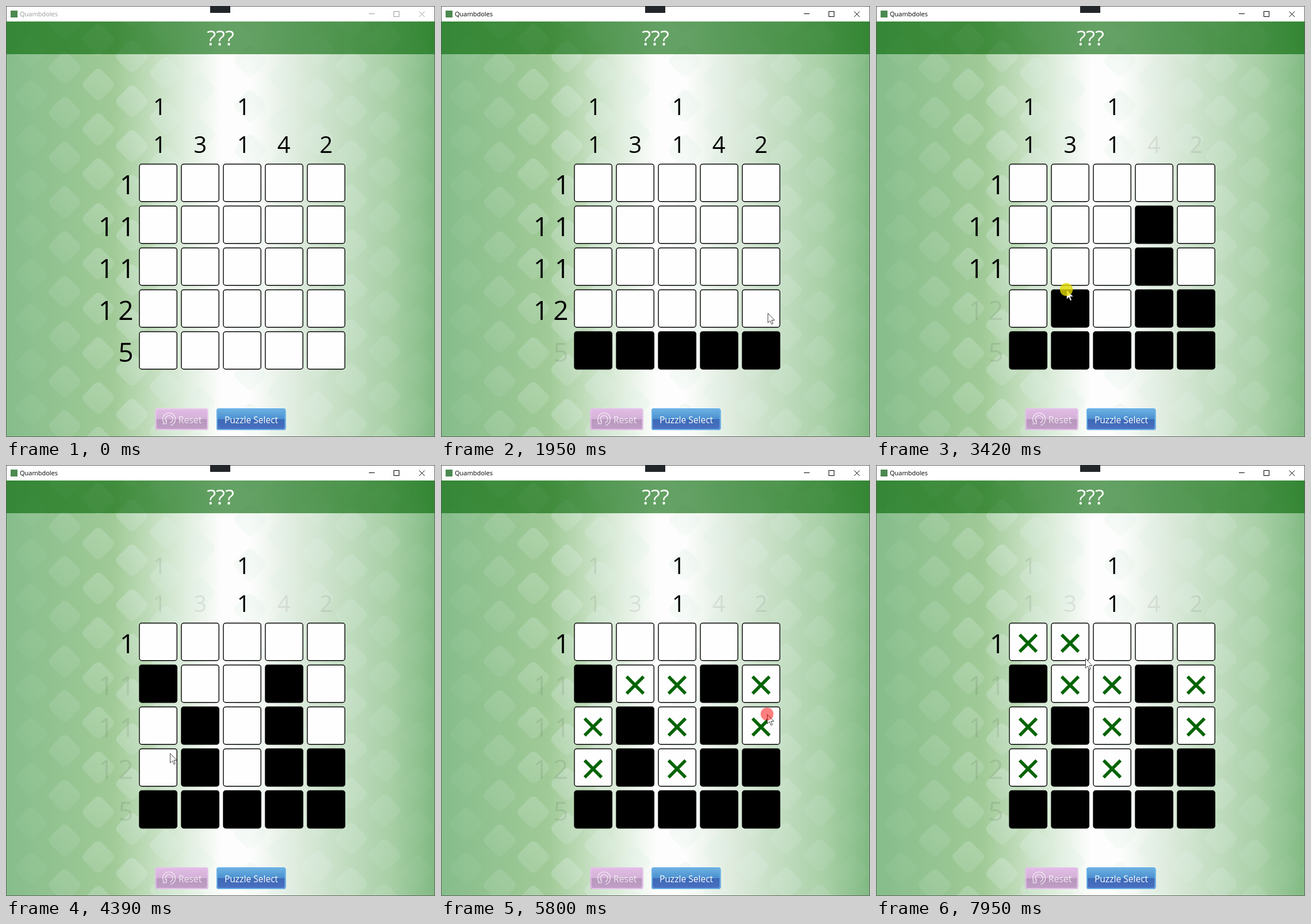
These frames come from a looping animation (746x751 px, 7.99 s). An HTML page with a canvas:

```html
<!DOCTYPE html>
<html lang="en">
<head>
<meta charset="utf-8">
<title>Quambdoles</title>
<style>
html, body { margin: 0; width: 100%; height: 100%; overflow: hidden; background: #fff; }
canvas { display: block; width: 746px; height: 751px; }
</style>
</head>
<body>
<canvas id="stage" width="746" height="751"></canvas>
<script>
const W = 746, H = 751, LOOP = 7990, FOCUS = 1110, LAG = 40;
const GRID = { x: 232, y: 275.5, step: 73, size: 65.3, n: 5 };
const FONT = '"Open Sans", "Noto Sans", sans-serif';
const ctx = document.getElementById('stage').getContext('2d');

const colHints = [[1, 1], [3], [1, 1], [4], [2]];
const rowHints = [[1], [1, 1], [1, 1], [1, 2], [5]];

const FILL = 'rgba(226,216,0,.8)', CROSS = 'rgba(255,0,0,.5)';

// Pointer legs: begin, end, pressed button, evenly timed stops.
// Each leg starts where the last one ended; a press lasts until the next leg.
const legs = [
  [80, 840, null, [700, 735], [440, 550], [262, 600]],
  [1110, 1470, FILL, [600, 605]],
  [1670, 1950, null, [568, 535]],
  [2000, 2150, FILL],
  [2150, 2430, null, [493, 522]],
  [2470, 2620, FILL, [488, 389]],
  [2820, 3090, null, [328, 518]],
  [3290, 3550, FILL, [331, 494], [328, 460]],
  [3550, 3930, null, [272, 390]],
  [4190, 4270, FILL],
  [4270, 4390, null, [285, 502]],
  [4430, 6030, CROSS, [460, 524], [452, 460], [249, 455], [326, 404],
    [470, 385], [578, 388], [566, 440], [564, 462]],
  [6030, 6490, null, [346, 326]],
  [6630, 6900, null, [272, 314]],
  [6900, 7040, CROSS],
  [7040, 7180, null, [294, 322]],
  [7340, 7480, null, [325, 318]],
  [7480, 7640, CROSS],
  [7640, 7950, null, [364, 337]]
].map(([begin, end, button, ...stops]) => ({ begin, end, button, stops }));

legs.forEach((leg, i) => {
  if (i) leg.stops.unshift(legs[i - 1].stops.at(-1));
});

const legAt = t => legs.findLast(leg => leg.begin <= t);

// Smooth curve through the stops, at rest at both ends.
function pointerAt(leg, t) {
  const p = leg.stops, n = p.length - 1;
  if (!n) return p[0];
  const u = Math.min(1, (t - leg.begin) / (leg.end - leg.begin)) * n;
  const i = Math.min(n - 1, Math.floor(u)), s = u - i, ease = s * s * (3 - 2 * s);
  const slope = (j, k) => {
    if (j === 0 || j === n) return 0;
    const a = p[j][k] - p[j - 1][k], b = p[j + 1][k] - p[j][k];
    return a * b > 0 ? (a + b) / 2 : 0;
  };
  return [0, 1].map(k => p[i][k] + (p[i + 1][k] - p[i][k]) * ease +
    s * (1 - s) * ((1 - s) * slope(i, k) - s * slope(i + 1, k)));
}

// A pressed pointer marks every empty cell it passes over.
function traceMarks() {
  const marks = new Map();
  for (const leg of legs.filter(l => l.button))
    for (let t = leg.begin; t <= leg.end; t += 5) {
      const [x, y] = pointerAt(leg, t);
      const gx = x - GRID.x, gy = y - GRID.y;
      const c = Math.floor(gx / GRID.step), r = Math.floor(gy / GRID.step);
      const inside = gx % GRID.step <= GRID.size && gy % GRID.step <= GRID.size;
      const key = r * GRID.n + c;
      if (inside && c < GRID.n && !marks.has(key))
        marks.set(key, { r, c, kind: leg.button, time: t + LAG });
    }
  return [...marks.values()];
}

function box(g, x, y, w, h, r) {
  g.beginPath();
  g.roundRect(x, y, w, h, r);
}

function line(g, ...p) {
  g.beginPath();
  for (let i = 0; i < p.length; i += 4) {
    g.moveTo(p[i], p[i + 1]);
    g.lineTo(p[i + 2], p[i + 3]);
  }
  g.stroke();
}

function text(g, str, x, y, size, color, align = 'center') {
  g.font = `${size}px ${FONT}`;
  g.textAlign = align;
  g.fillStyle = color;
  g.fillText(str, x, y);
}

// Centres the visible ink of a digit on x.
function digit(n, x, y, size, color) {
  ctx.font = `${size}px ${FONT}`;
  ctx.textAlign = 'center';
  const m = ctx.measureText(n);
  text(ctx, n, x + (m.actualBoundingBoxLeft - m.actualBoundingBoxRight) / 2, y, size, color);
}

function gradient(g, x0, y0, x1, y1, stops) {
  const grad = g.createLinearGradient(x0, y0, x1, y1);
  stops.forEach(([at, color]) => grad.addColorStop(at, color));
  return grad;
}

function diamond(g, x, y) {
  const fade = Math.min(1, Math.min(x, W - x) / 220);
  g.save();
  g.translate(x, y);
  g.rotate(Math.PI / 4);
  box(g, -22, -22, 44, 44, 9);
  g.fillStyle = gradient(g, -22, -22, 22, 22,
    [[0, `rgba(222,239,230,${.36 * fade})`], [1, `rgba(222,239,230,${.18 * fade})`]]);
  g.fill();
  g.restore();
}

function button(g, x, w, edge, colors) {
  box(g, x, 701, w, 38, 4);
  g.fillStyle = gradient(g, 0, 701, 0, 739,
    [[0, colors[0]], [.5, colors[1]], [.51, colors[2]], [1, colors[3]]]);
  g.fill();
  box(g, x + 1, 702, w - 2, 36, 4);
  g.strokeStyle = edge;
  g.lineWidth = 2;
  g.stroke();
}

function makeBackdrop() {
  const c = document.createElement('canvas');
  c.width = W;
  c.height = H;
  const g = c.getContext('2d');
  g.fillStyle = gradient(g, 0, 0, W, 0, [
    [0, '#86bd8b'], [.25, '#a0ca97'], [.41, '#dcecda'], [.5, '#fcfdfc'],
    [.57, '#fcfdfc'], [.67, '#e0ecdf'], [.9, '#a7cfa5'], [1, '#80b982']
  ]);
  g.fillRect(0, 0, W, H);
  // two slanted lattices, one per half
  for (const [x0, y0] of [[43.5, 79], [424.5, 96]])
    for (let k = 0; k < 6; k++)
      for (let y = (y0 + 29 * k) % 78; y < H + 40; y += 78) diamond(g, x0 + 58.5 * k, y);

  g.fillStyle = 'rgba(0,100,0,.6)';
  g.fillRect(0, 27, W, 57);
  text(g, '???', 373, 69, 37, '#fff');

  g.fillStyle = '#fff';
  g.fillRect(0, 0, W, 27);
  g.strokeStyle = '#5c605c';
  g.lineWidth = 1;
  g.strokeRect(.5, .5, W - 1, H - 1);
  g.fillStyle = '#222529';
  g.fillRect(355, 0, 35, 12);
  g.fillStyle = '#4c8a50';
  g.fillRect(8, 8, 12, 12);

  button(g, 366, 120.5, '#67b0e8', ['#6fb3e2', '#4a8fd0', '#3c69b6', '#4c70c2']);
  text(g, 'Puzzle Select', 426.5, 727, 15.6, '#fff');
  return c;
}

function drawTitle(active) {
  const color = active ? '#000' : '#999';
  text(ctx, 'Quambdoles', 24, 18, 11, color, 'left');
  ctx.strokeStyle = color;
  ctx.lineWidth = 1;
  line(ctx, 631, 13.5, 641, 13.5);
  ctx.strokeRect(674.5, 9.5, 9, 9);
  line(ctx, 718.5, 9.5, 728, 19, 728, 9.5, 718.5, 19);
}

function drawReset(active) {
  button(ctx, 259.5, 92, active ? '#e4c0ea' : '#e9c8ec',
    ['#e2bde6', '#d3b1d6', '#b897bc', '#c19fc7']);
  const color = 'rgba(255,255,255,.78)';
  text(ctx, 'Reset', 320, 727, 15.8, color);
  ctx.strokeStyle = color;
  ctx.lineWidth = 1.2;
  for (const radius of [11, 6.5]) {
    ctx.beginPath();
    ctx.arc(283.5, 720, radius, 2.4, 7.6);
    ctx.stroke();
  }
  line(ctx, 272, 728, 279, 728, 279, 728, 279, 721);
}

function drawHints(done) {
  const shade = (list, axis, i) => {
    const n = done.filter(m => m.kind === FILL && m[axis] === i).length;
    return n === list.reduce((a, b) => a + b) ? 'rgba(0,0,0,.08)' : '#000';
  };
  colHints.forEach((list, c) => list.toReversed().forEach((n, i) =>
    digit(n, 264.3 + GRID.step * c, 256 - 66 * i, 40, shade(list, 'c', c))));
  rowHints.forEach((list, r) => list.toReversed().forEach((n, i) =>
    digit(n, 208.3 - 37 * i, 328 + GRID.step * r, 46, shade(list, 'r', r))));
}

function drawCell(r, c, mark) {
  const x = GRID.x + GRID.step * c, y = GRID.y + GRID.step * r;
  box(ctx, x, y, GRID.size, GRID.size, 4);
  ctx.fillStyle = mark === FILL ? '#000' : '#fefefe';
  ctx.fill();
  ctx.strokeStyle = '#000';
  ctx.lineWidth = 1.4;
  ctx.stroke();
  if (mark !== CROSS) return;
  const cx = x + 32.5, cy = y + 35, d = 14.7;
  ctx.strokeStyle = '#006400';
  ctx.lineWidth = 5.6;
  line(ctx, cx - d, cy - d, cx + d, cy + d, cx + d, cy - d, cx - d, cy + d);
}

function drawPointer(t) {
  const leg = legAt(t);
  if (!leg) return;
  const [x, y] = pointerAt(leg, t).map(Math.round);
  const shape = [[0, 0], [0, 16.5], [3.8, 13], [6.4, 19], [8.8, 18], [6.3, 12], [11.5, 12]];
  ctx.beginPath();
  shape.forEach(([dx, dy]) => ctx.lineTo(x + .5 + dx, y + .5 + dy));
  ctx.closePath();
  ctx.fillStyle = '#fff';
  ctx.fill();
  ctx.strokeStyle = '#333';
  ctx.lineWidth = .9;
  ctx.stroke();
  if (!leg.button) return;
  ctx.beginPath();
  ctx.arc(x, y, 11.2, 0, 7);
  ctx.fillStyle = leg.button;
  ctx.fill();
}

const backdrop = makeBackdrop();
const marks = traceMarks();

function draw(t) {
  const done = marks.filter(m => m.time <= t);
  ctx.drawImage(backdrop, 0, 0);
  drawTitle(t >= FOCUS);
  drawReset(t >= FOCUS);
  drawHints(done);
  for (let r = 0; r < GRID.n; r++)
    for (let c = 0; c < GRID.n; c++)
      drawCell(r, c, done.find(m => m.r === r && m.c === c)?.kind);
  drawPointer(t);
}

const start = performance.now();
function tick() {
  draw((performance.now() - start) % LOOP);
  requestAnimationFrame(tick);
}
tick();
</script>
</body>
</html>
```
